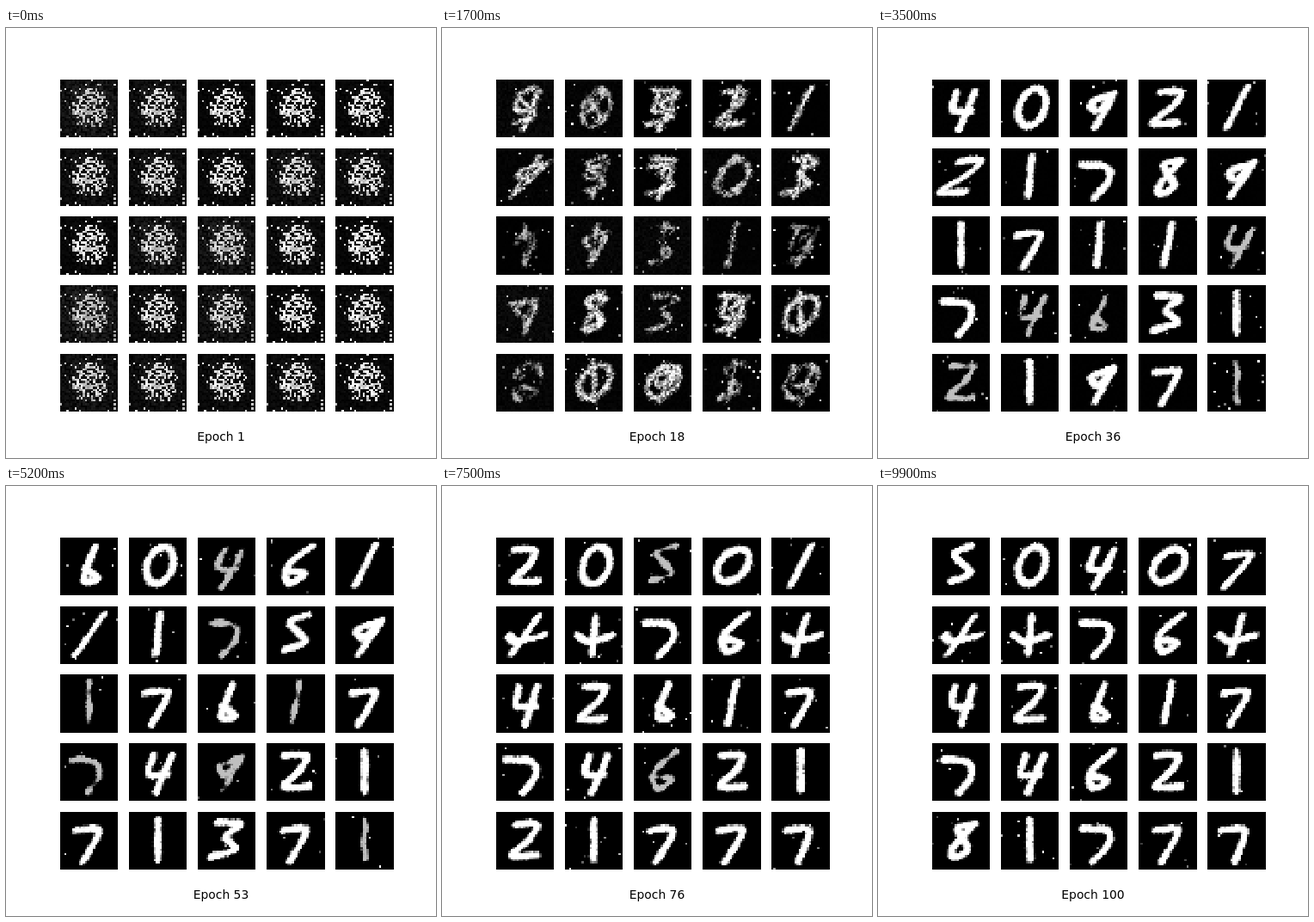
An HTML page with a canvas that plays this animation: 500 by 500 pixels, repeating every 10000 ms.

```html
<!DOCTYPE html>
<html>
<head>
<meta charset="utf-8">
<style>
html, body { margin: 0; width: 100%; height: 100%; overflow: hidden; background: #fff; }
canvas { display: block; }
</style>
</head>
<body>
<canvas id="stage" width="500" height="500"></canvas>
<script>
const N = 28;
const stage = document.getElementById('stage').getContext('2d');
const makeTile = () => {
  const c = document.createElement('canvas');
  c.width = c.height = N;
  return c.getContext('2d', { willReadFrequently: true });
};
const pen = makeTile(), tile = makeTile();
const pixels = tile.createImageData(N, N);

const clamp = v => Math.max(0, Math.min(1, v));
const mix = (a, b, t) => a + (b - a) * t;
const ease = (lo, hi, v) => (v = clamp((v - lo) / (hi - lo)), v * v * (3 - 2 * v));

function random(seed) {
  return () => {
    seed = seed + 0x6D2B79F5 | 0;
    let t = Math.imul(seed ^ seed >>> 15, 1 | seed);
    t = t + Math.imul(t ^ t >>> 7, 61 | t) ^ t;
    return ((t ^ t >>> 14) >>> 0) / 4294967296;
  };
}

// Key points of the pen strokes; the zeros (0 upright, o tilted) are ellipses
const strokes = {
  1: '14,4 14,23',
  2: '8,6 18,6 16,13 9,21 21,21',
  3: '8,5 19,6 13,12 19,18 8,22',
  4: '11,6 10,15 19,15|20,6 14,24',
  5: '18,4 10,8 19,17 10,21',
  6: '19,4 10,14 13,22 19,18 11,16',
  7: '7,9 18,9 13,24',
  8: '19,6 11,8 18,18 12,22 11,17 19,6',
  9: '20,7 10,11 14,15 20,7 14,23',
  c: '5,8 17,9 19,16 13,24',
  d: '16,5 12,20 19,20 12,15',
  t: '14,5 14,23|6,14 12,17 23,14'
};

// One glyph per tile, ~ marks a weak one
const keys = [
  [10, '48~311 9930~3 1~1~3~13~ 9~834o 0~oo1~o'],
  [26, '50421 15~7o1 9~91~1~4~ 753~31 6~1954~'],
  [36, '40921 21c89 17114~ c4~d~31 2~1971~'],
  [53, 'd04~61 11c~59 1~7d1~7 c~49~21 71371~'],
  [76, '205~o1 ttc6t 42d17 c46~21 21777'],
  [100, '504o7 ttc6t 42d17 c4621 81c77']
].map(([epoch, line]) => ({ epoch, glyphs: line.match(/\w~?/g).map(makeGlyph) }));

// Each tile keeps its slant through the whole training
function slantOf(cell) {
  return Number('1223571123021220121020220'[cell]) / 10;
}

// Smooth curve through the points
function trace(points) {
  const at = i => points[Math.max(0, Math.min(points.length - 1, i))];
  pen.moveTo(...points[0]);
  for (let i = 1; i < points.length; i++) {
    const [p, a, b, n] = [at(i - 2), at(i - 1), at(i), at(i + 1)];
    pen.bezierCurveTo(a[0] + (b[0] - p[0]) / 6, a[1] + (b[1] - p[1]) / 6,
      b[0] - (n[0] - a[0]) / 6, b[1] - (n[1] - a[1]) / 6, ...b);
  }
}

function makeGlyph([name, weak], cell) {
  const slant = name === 'o' ? 0 : slantOf(cell);
  pen.setTransform(1, 0, 0, 1, 0, 0);
  pen.clearRect(0, 0, N, N);
  pen.setTransform(1, 0, -slant, 1, slant * 14, 0);
  pen.beginPath();
  if (name === '0') pen.ellipse(15, 13.5, 6.5, 9, 0, 0, 7);
  else if (name === 'o') pen.ellipse(14.5, 13.5, 9.5, 6, -0.8, 0, 7);
  else strokes[name].split('|').forEach(s => trace(s.split(' ').map(p => p.split(',').map(Number))));
  pen.lineJoin = pen.lineCap = 'round';
  pen.globalCompositeOperation = 'lighter';
  pen.globalAlpha = 1 / 7;
  for (let width = 1.5; width < 8; width++) {
    pen.lineWidth = width;
    pen.stroke();
  }
  pen.globalCompositeOperation = 'source-over';
  const data = pen.getImageData(0, 0, N, N).data;
  const ink = Float32Array.from({ length: N * N }, (_, i) => data[i * 4 + 3] / 255);
  return { ink, weak: weak ? 1 : 0 };
}

// The noise cloud that every tile shares at the start
const cloudRnd = random(41);
const cloud = Float32Array.from({ length: N * N }, (_, i) => {
  const d = Math.hypot((i % N - 14) / 9, ((i / N | 0) - 12.5) / 10.5);
  const chance = mix(0.52, 0.035, ease(0.7, 1.2, d));
  return cloudRnd() < chance ? 0.65 + 0.35 * cloudRnd() : 0.25 * cloudRnd() * (1.4 - d / 2);
});

function drawTile(cell, epoch, from, to, w) {
  const a = from.glyphs[cell], b = to.glyphs[cell];
  const rnd = random(epoch * 7919 + cell * 104729);
  const haze = random(cell + 5)() ** 2;
  const early = Math.exp((10 - Math.max(10, epoch)) / 10);
  const start = clamp((10 - epoch) / 9);
  const weak = mix(a.weak, b.weak, w);
  const fade = 0.14 + 0.3 * weak, gain = 1 - 0.25 * weak;
  const spread = 0.14 + 0.26 * early, jitter = 0.16 + 0.32 * early;
  const specks = 0.004 + 0.014 * early;
  const phase = cell * 2.4 + epoch * 0.15;

  for (let i = 0; i < N * N; i++) {
    const x = i % N, y = i / N | 0, r = rnd(), q = rnd();
    const ink = Math.max(a.ink[i] * (1 - w * w), b.ink[i] * w * (2 - w));
    const patch = 0.5 + 0.5 * Math.sin(x * 0.5 + phase) * Math.sin(y * 0.45 + phase * 1.7);
    let v = gain * ease(0.55 - spread, 0.55 + spread, ink - fade * patch + jitter * (r - 0.5) * (ink > 0.05));
    v = Math.max(v, haze * early * r * 0.25);
    if (q < specks) v = Math.max(v, 0.2 + 0.8 * r);
    if (start) {
      const dot = cloud[i];
      const noisy = dot > 0.4 ? dot * (1.1 - 0.35 * haze * (0.6 + r)) : dot * (0.25 + 1.1 * haze);
      v = mix(v, noisy, start);
    }
    pixels.data.fill(255 * clamp(v), i * 4, i * 4 + 3);
    pixels.data[i * 4 + 3] = 255;
  }
  tile.putImageData(pixels, 0, 0);
  const col = cell % 5, row = cell / 5 | 0;
  stage.drawImage(tile.canvas, 63 + Math.floor(col * 80.1), Math.round(60 + row * 79.7),
    col > 2 ? 68 : 67, row === 2 ? 68 : 67);
}

function draw(epoch) {
  stage.fillStyle = '#fff';
  stage.fillRect(0, 0, 500, 500);
  stage.imageSmoothingEnabled = false;
  const next = Math.max(1, keys.findIndex(k => k.epoch >= epoch));
  const from = keys[next - 1], to = keys[next];
  const w = ease(0.15, 0.85, (epoch - from.epoch) / (to.epoch - from.epoch));
  for (let cell = 0; cell < 25; cell++) drawTile(cell, epoch, from, to, w);
  stage.fillStyle = '#000';
  stage.font = '13.89px "DejaVu Sans", sans-serif';
  stage.textAlign = 'center';
  stage.fillText('Epoch ' + epoch, 250, 480);
}

let shown = 0;
function tick() {
  const epoch = Math.floor(performance.now() / 100) % 100 + 1;
  if (epoch !== shown) draw(shown = epoch);
  requestAnimationFrame(tick);
}
tick();
</script>
</body>
</html>
```
